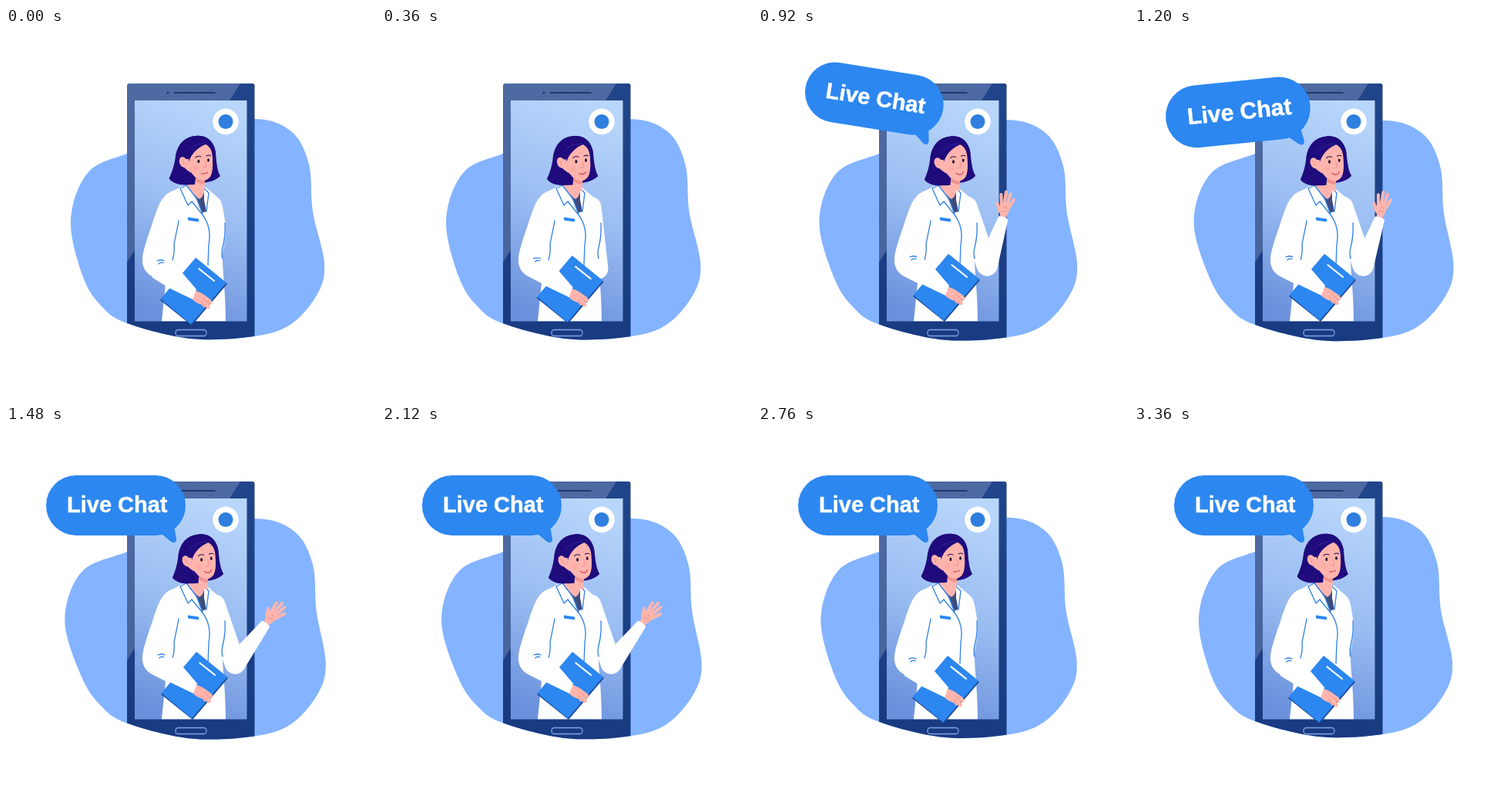
An HTML page that plays this animation: 480x480 px, repeating every 3400 ms.

```html
<!DOCTYPE html>
<html lang="en">
<head>
<meta charset="utf-8">
<title>Live Chat</title>
<style>
  html, body { margin: 0; width: 100%; height: 100%; overflow: hidden; background: #fff; }
  svg { display: block; width: 100vw; height: 100vh; }
  .skin { fill: #ffb5ad; }
  .hair { fill: #200b7d; }
  .coat { fill: #fff; }
  .blue { fill: #2c87f0; }
  .seam { fill: none; stroke: #2f80e4; stroke-width: 1.3; stroke-linecap: round; stroke-linejoin: round; }
  .ink { fill: none; stroke: #2a1450; stroke-width: 1.1; stroke-linecap: round; }
  .finger { fill: none; stroke: #ffb5ad; stroke-width: 4; stroke-linecap: round; }
  .crease { fill: none; stroke: #ee8d89; stroke-width: .9; stroke-linecap: round; }
  text { font: bold 29px "Liberation Sans", Arial, sans-serif; fill: #fff; stroke: #fff; stroke-width: .5; stroke-linejoin: round; }
</style>
</head>
<body>
<svg viewBox="0 0 480 480">
  <defs>
    <linearGradient id="case" x1="0" y1="0" x2="0" y2="1">
      <stop offset="0" stop-color="#21458a"/>
      <stop offset="1" stop-color="#183a80"/>
    </linearGradient>
    <linearGradient id="screen" x1=".6" y1="0" x2=".4" y2="1">
      <stop offset="0" stop-color="#b8d6fb"/>
      <stop offset=".5" stop-color="#9abdf2"/>
      <stop offset="1" stop-color="#6b91dc"/>
    </linearGradient>
    <clipPath id="cut">
      <path id="cutBlob"/>
      <rect width="480" height="300"/>
    </clipPath>
  </defs>

  <path id="blob" fill="#84b4ff"/>

  <g clip-path="url(#cut)">
    <rect x="157" y="72" width="165.500" height="340" rx="3" fill="url(#case)"/>
    <path d="M160 72H304L157 304V75Q157 72 160 72Z" fill="#fff" opacity=".2"/>
    <rect x="167" y="94" width="145.500" height="286.500" fill="url(#screen)"/>
    <path d="M218 84H271" stroke="#142a5c" stroke-width="1.600" stroke-linecap="round"/>
    <circle cx="210" cy="84" r="1.300" fill="#142a5c"/>
    <rect x="220" y="391.500" width="40" height="8" rx="3.500" fill="none" stroke="#7ea2e6" stroke-width="1.300"/>
  </g>

  <circle cx="285" cy="121.500" r="16.800" fill="#fff"/>
  <circle cx="285" cy="121.500" r="9.500" fill="#2f7fdf"/>

  <g id="upper">
    <path d="M271 232L297 308" stroke="#fff" stroke-width="27" stroke-linecap="round"/>
    <g id="fore">
      <g id="hand">
        <path class="skin" d="M-4 4L-4.500 -6Q-8 -14 -6 -18H6Q8 -10 4 -4V4Z"/>
        <path class="finger" d="M-5 -9L-10 -19M-4 -17L-6 -31M-.500 -17L0 -35M3 -17L6 -33M5 -13L11 -26"/>
        <path class="crease" d="M-3 -9Q0 -12 4 -10M-1 -15Q2 -16 4 -14"/>
      </g>
      <path class="coat" d="M-13 0L-6.500 -65Q0 -68 6.500 -65L14 0A13.500 13.500 0 0 1 -13 0Z"/>
    </g>
  </g>

  <g id="torso">
    <path class="coat" d="M228 205C220 211 211 212 206 218C199 225 195 238 191 250C184 271 178 287 177 299C176 313 184 320 193 324L207 331L202 380.300H285C285 340 280 310 281 291C285 275 286 262 284 250C282 237 281 227 277 222C272 217 265 212 260 207Z"/>
    <path d="M243 216L258 211L260 238L253 240Z" fill="#3d4b7d"/>
    <path class="skin" d="M238 188L259 190L257 212Q256 219 251 222Q243 217 236 205Z"/>
    <path class="coat" d="M234 203L247 222L254 240L242 228L239 232L226 207Z"/>
    <path class="coat" d="M257 208L262 213L260 238L257 223Z"/>
    <path class="seam" d="M234 204L226 208L236 230L241 225L254 241C262 251 266 265 263 281L262 308M234 204L248 222L255 241M257 208L263 214L260 238"/>
    <path class="seam" d="M224 250C222 262 219 274 218 281Q219 291 216 301M284 253Q285 270 281 285Q279 292 281 299"/>
    <path class="blue" d="M236 245.500L250 247.500V251.500L236 249.500Z"/>
  </g>

  <g id="book">
    <path d="M247 299L287 332L241 386L200 353Z" fill="#1c4695"/>
    <path class="blue" d="M246 298L286 330.500L240 384.500L200.500 351.500Z"/>
    <path d="M250.500 312.500L270 328" stroke="#fff" stroke-width="2.200" stroke-linecap="round"/>
    <path class="skin" d="M244 340Q254 343 261 349Q268 353 267.500 357Q266 360 263 357L265 362Q263 367 259 362Q257 364 254 359Q246 357 241 351Z"/>
    <path class="crease" d="M256 351L263 357M253 354L259 362"/>
    <path class="coat" d="M186 300L213 304L229 318L247 339L242 352L213 338L190 324Z"/>
    <path class="seam" d="M196 302Q201 300 205 302M198 306Q201 303 204 305"/>
  </g>

  <g id="head">
    <path class="hair" d="M246 140C260 138 270 147 272 161C273 175 274 185 278 192C272 198 264 200 254 201L238 203C226 205 215 201 211.500 195C217 184 219 175 220 165C223 150 232 141 246 140Z"/>
    <path class="skin" d="M244 188L258 192L257 211Q248 212 244 204Z"/>
    <path d="M244 191Q250 198 258 198L257 203Q248 202 244 196Z" fill="#f0958f"/>
    <path class="skin" d="M235 164Q242 150 259 150Q268 154 268 170Q269 187 265 193Q260 199 254 198Q244 195 238 184Q234 174 235 164Z"/>
    <path class="hair" d="M246 140C260 138 270 147 272 162L268 166C267 157 263 153 259 151C251 154 241 161 237 174L238 184Q241 191 246 194L245 203Q226 205 213 196L221 168C224 150 232 141 246 140Z"/>
    <ellipse class="skin" cx="230" cy="174" rx="5" ry="7" transform="rotate(-18 230 174)"/>
    <path class="skin" d="M230 170H237L240 188Q234 184 230 180Z"/>
    <path class="crease" d="M228 171Q231 173 231 178"/>
    <path d="M258 150Q244 149 233 160" fill="none" stroke="#3a26a3" stroke-width=".8"/>
    <ellipse cx="249.800" cy="173" rx="1.500" ry="2.300" fill="#1f1238"/>
    <ellipse cx="262.500" cy="171.500" rx="1.400" ry="2.300" fill="#1f1238"/>
    <path class="ink" d="M246 168Q249 165 253 167M260 166Q263 164 265.500 166"/>
    <path class="crease" d="M258 173L260 180Q258 182 256 181"/>
    <circle cx="246" cy="182" r="3.500" fill="#ff9a98" opacity=".4"/>
    <path id="mouth" fill="none" stroke="#d4465c" stroke-width="1.300" stroke-linecap="round"/>
  </g>

  <g id="bubble">
    <rect class="blue" x="-167" y="-86" width="181" height="78" rx="39"/>
    <path class="blue" d="M-22 -14L-5 0Q2 4 2 -4L-2 -26Z"/>
    <text x="-140" y="-38">Live Chat</text>
  </g>
</svg>
<script>
  const LOOP = 3400, STEP = 40;
  const $ = id => document.getElementById(id);
  const move = (id, value) => $(id).setAttribute('transform', value);
  const show = (id, on) => { $(id).style.display = on ? '' : 'none'; };

  const ramp = (t, from, to) => Math.min(1, Math.max(0, (t - from) / (to - from)));
  const smooth = u => u * u * (3 - 2 * u);
  const pulse = (t, a, b, c, d) => smooth(ramp(t, a, b)) - smooth(ramp(t, c, d));
  const springy = u => 1 + 2.5 * (u - 1) ** 3 + 1.5 * (u - 1) ** 2;

  const outline = [
    [320, 118], [370, 134], [393, 177], [398, 238], [413, 305], [404, 345], [370, 384],
    [322, 400], [240, 403], [157, 383], [124, 361], [100, 323], [84, 250], [106, 188],
    [157, 163], [240, 138]
  ];

  // The upper part widens about x = 290, the whole sinks a little.
  const swollen = ([x, y], k) => {
    const fade = Math.min(1, (400 - y) / 170);
    return [x + (x - 290) * .05 * k * fade * Math.max(0, fade), y + 2.5 * k];
  };

  // Catmull-Rom loop through the points
  function closedCurve(pts) {
    const n = pts.length, p = i => pts[(i + n) % n];
    const lean = (a, b, c, s) => [0, 1].map(k => b[k] + s * (c[k] - a[k]) / 6);
    const arcs = pts.map((b, i) =>
      `C${lean(p(i - 1), b, p(i + 1), 1)} ${lean(b, p(i + 1), p(i + 2), -1)} ${p(i + 1)}`);
    return `M${pts[0]}${arcs.join('')}Z`;
  }

  function drawBlob(t) {
    const k = (1 - Math.cos(2 * Math.PI * t / LOOP)) / 2;
    const d = closedCurve(outline.map(pt => swollen(pt, k)));
    for (const id of ['blob', 'cutBlob']) $(id).setAttribute('d', d);
  }

  function drawBody(t) {
    const up = pulse(t, 80, 600, 2200, 2800);
    move('head', `translate(${4.6 * up} ${.6 * up}) rotate(${-1.5 * up} 248 205)`);
    move('book', `translate(${up} ${-5 * up})`);
    $('mouth').setAttribute('d', `M${254 - up} ${189 - up}Q${258 + up} ${189.5 + 3 * up} ${261.5 + up} ${187.5 - up}`);
  }

  function drawArm(t) {
    const out = pulse(t, 160, 600, 2280, 2680);
    const wave = Math.sin(2 * Math.PI * ramp(t, 1160, 2440)) ** 2;
    const tilt = 22 * (1 - out);
    const angle = -15 + 34 * out + 19 * wave;
    show('upper', out > 0);
    move('upper', `rotate(${tilt} 270 232)`);
    move('fore', `translate(297 308) rotate(${angle - tilt}) scale(${.6 + .4 * out})`);
    move('hand', `translate(0 -64) rotate(${(angle - 38) * .65})`);
  }

  function drawBubble(t) {
    const size = springy(ramp(t, 640, 1340));
    const turn = 90 * (1 - springy(ramp(t, 700, 1400)));
    show('bubble', t > 640);
    move('bubble', `translate(219 150) rotate(${turn}) scale(${size})`);
  }

  const start = performance.now();
  function tick() {
    const now = (performance.now() - start) % LOOP;
    const t = Math.floor(now / STEP) * STEP;
    for (const part of [drawBlob, drawBody, drawArm, drawBubble]) part(t);
    requestAnimationFrame(tick);
  }
  tick();
</script>
</body>
</html>
```
